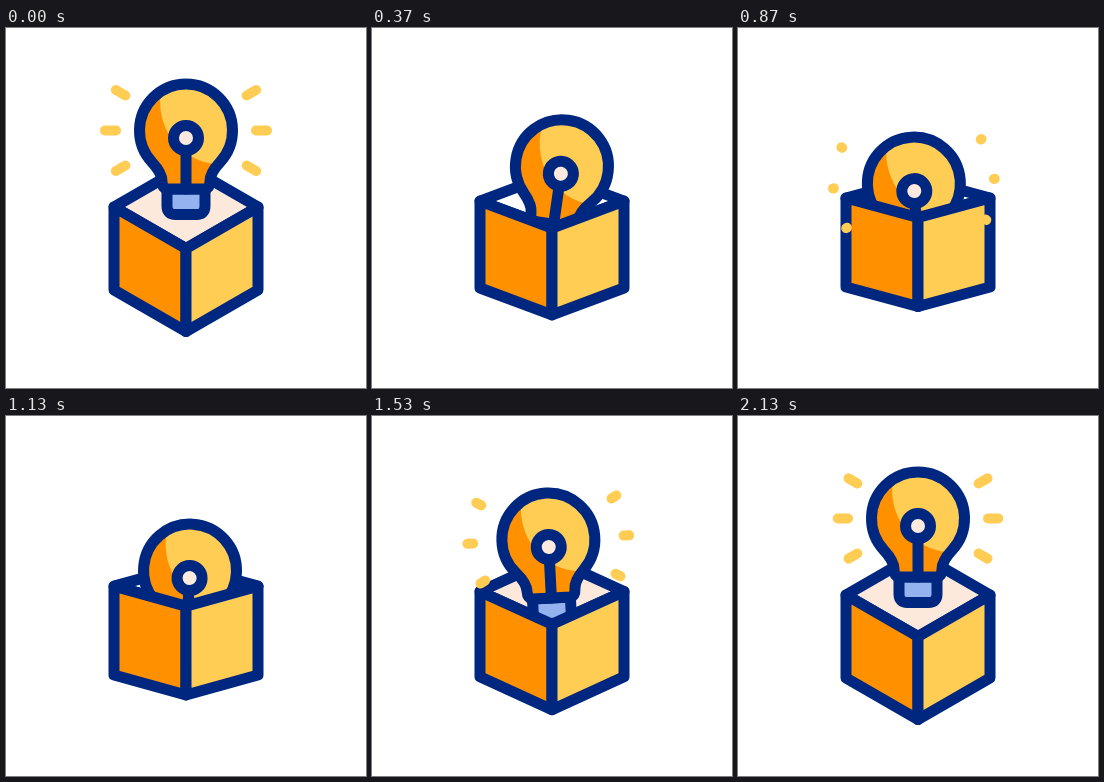
These frames come from a looping animation (360 px wide and 360 px high, 2170 ms). An HTML page:

```html
<!DOCTYPE html>
<html lang="en">
<head>
<meta charset="utf-8">
<title>Idea out of the box</title>
<style>
html, body { margin: 0; width: 100%; height: 100%; overflow: hidden; background: #fff; }
svg { display: block; width: 100vw; height: 100vh; }
.ink { stroke: #002780; stroke-width: 11; stroke-linejoin: round; stroke-linecap: round; }
#rays { stroke: #ffcc54; stroke-width: 10; stroke-linecap: round; }
</style>
</head>
<body>
<svg viewBox="0 0 360 360">
  <path id="lid" class="ink"/>
  <g id="bulb" class="ink" fill="none">
    <path fill="#94b1f0" d="M161 161V178q0 8.5 8.5 8.5h21q8.5 0 8.5-8.5V161z"/>
    <path id="glass" fill="#ff9100" stroke="none"/>
    <path fill="#ffcc54" stroke="none" d="M155 62C149 98 172 132 209 136A46.5 46.5 0 0 0 155 62z"/>
    <path id="rim"/>
    <path d="M180 122V161"/>
    <circle cx="180" cy="110" r="12.5" fill="#fdeadf"/>
  </g>
  <path id="left" class="ink" fill="#ff9100"/>
  <path id="right" class="ink" fill="#ffcc54"/>
  <g id="rays"></g>
</svg>
<script>
const LOOP = 2170, BEAT = LOOP / 3, CX = 180, CY = 102.5, PIVOT = 172.5;
const el = id => document.getElementById(id);
const clamp = v => Math.max(0, Math.min(1, v));
const poly = (...pts) => 'M' + pts.map(p => p.join(' ')).join('L') + 'z';

// [time, value] keys
const SINK = [[0, 0], [370, 35], [530, 46], [630, 51], [880, 53],
              [1130, 52], [1530, 21], [1600, 11], [1860, 0], [LOOP, 0]];
const TILT = [[0, 0], [361, 8.2], [723, -7.4], [1085, 3.6], [1446, -3.4], [1830, 0], [LOOP, 0]];

// Monotone cubic interpolation, flat at every extreme
function track(keys, t) {
  const slope = i => (keys[i + 1][1] - keys[i][1]) / (keys[i + 1][0] - keys[i][0]);
  const tangent = i => {
    if (i === 0 || i === keys.length - 1) return 0;
    const a = slope(i - 1), b = slope(i);
    return a * b > 0 ? 2 * a * b / (a + b) : 0;
  };
  let i = 0;
  while (i < keys.length - 2 && t >= keys[i + 1][0]) i++;
  const [t0, v0] = keys[i], [t1, v1] = keys[i + 1];
  const h = t1 - t0, u = (t - t0) / h, w = 1 - u;
  return v0 * (1 + 2 * u) * w * w + v1 * u * u * (3 - 2 * u)
       + h * u * w * (tangent(i) * w - tangent(i + 1) * u);
}

const outline = 'M161 161Q156 160 156 153C156 145 150 138.5 146 134.2' +
  'A46.5 46.5 0 1 1 214 134.2C210 138.5 204 145 204 153Q204 160 199 161z';
el('glass').setAttribute('d', outline);
el('rim').setAttribute('d', outline);

const rays = [-30, 0, 30, 150, 180, 210].map(angle => {
  const line = document.createElementNS('http://www.w3.org/2000/svg', 'line');
  line.setAttribute('transform', `translate(${CX} ${CY}) rotate(${angle})`);
  return el('rays').appendChild(line);
});

function drawBox(s) {
  const depth = 41.5 - 22 * s, top = 179 - 9 * s, base = 262 - 3 * s;
  const l = [108, top], r = [252, top], front = [CX, top + depth];
  const bottom = [CX, base + depth];
  el('lid').setAttribute('d', poly(l, [CX, top - depth], r, front));
  el('lid').setAttribute('fill', s > 0.55 ? '#fff' : '#fde8dc');
  el('left').setAttribute('d', poly(l, front, bottom, [108, base]));
  el('right').setAttribute('d', poly(r, front, bottom, [252, base]));
}

function drawRays(phase) {
  const grow = phase > 0.5 ? clamp((phase - 0.76) / 0.2) : 1;
  const trim = phase < 0.5 ? clamp((phase - 0.02) / 0.2) : 0;
  el('rays').style.display = grow > trim ? '' : 'none';
  for (const ray of rays) {
    ray.setAttribute('x1', 70 + 11 * trim);
    ray.setAttribute('x2', 70 + 11 * grow);
  }
}

function draw(t) {
  const sink = track(SINK, t);
  const pose = `translate(0 ${sink}) rotate(${track(TILT, t)} ${CX} ${PIVOT})`;
  el('bulb').setAttribute('transform', pose);
  el('rays').setAttribute('transform', pose);
  drawBox(sink / 53);
  drawRays(t % BEAT / BEAT);
}

const start = performance.now();
function tick() {
  draw((performance.now() - start) % LOOP);
  requestAnimationFrame(tick);
}
tick();
</script>
</body>
</html>
```
